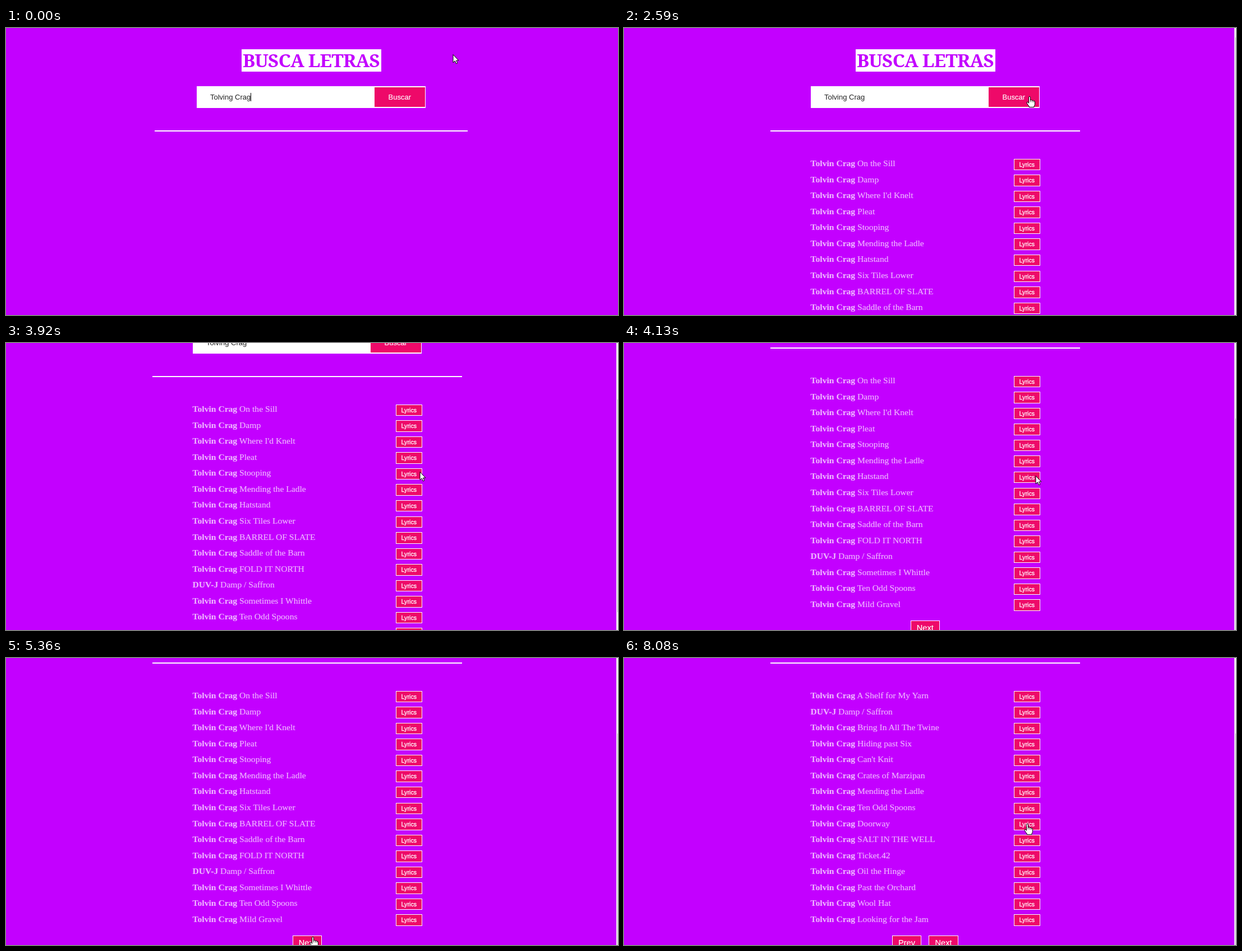
Write an HTML page that moves like this. It is 1091 px wide and 513 px high and loops after 8270 ms.

```html
<!DOCTYPE html>
<html lang="es">
<head>
<meta charset="utf-8">
<title>Busca letras</title>
<style>
  html, body { margin: 0; width: 100%; height: 100%; overflow: hidden; background: #c300ff; }
  #stage { position: absolute; inset: 0; overflow: clip; contain: strict; }
  #page { position: absolute; inset: 0; font-family: "Liberation Sans", Arial, sans-serif; color: #fff; }
  #page *, #bar, #bar i, svg { position: absolute; box-sizing: border-box; white-space: pre; }
  h1 { left: 419.5px; top: 37.5px; width: 249px; height: 40px; margin: 0; background: #fff; color: #c300ff;
       font: bold 33px/40px "Noto Serif", serif; letter-spacing: -.8px; text-align: center; }
  #form { left: 340px; top: 103.5px; width: 408px; height: 39.5px; background: #fff; font-size: 13px; line-height: 39px; }
  #query { left: 24px; color: #222; }
  #caret { left: 96px; top: 12px; width: 1px; height: 15px; background: #000; }
  .btn { background: #ee0969; color: #fff; text-align: center; -webkit-text-stroke: .15px; }
  #search { left: 317px; top: 2px; width: 89.5px; height: 35.5px; line-height: 35px; }
  #rule { left: 265px; top: 183px; width: 558px; height: 2px; background: #fff; }
  .results h1 { left: 412.5px; }
  .results #form { left: 333px; }
  .results #rule { left: 261px; width: 551.5px; }
  .row { left: 332.6px; width: 409px; height: 28.53px; color: #edb3ff; -webkit-text-stroke: .2px;
         font: 15.6px/28.53px "Liberation Serif", "Times New Roman", serif; }
  #page .row b { position: static; }
  .lyrics { right: 0; top: 5.5px; width: 46.5px; height: 20.5px; border: 1px solid #fff; -webkit-text-stroke: .3px;
            font: 10.7px/18.5px "Liberation Sans", Arial, sans-serif; }
  .nav { top: 671px; width: 52.5px; height: 27px; border: 1.5px solid #fff; font-size: 14.6px; line-height: 24px; }
  #bar { left: 1088px; top: 0; width: 3px; height: 100%; background: #f1f1f1; }
  #bar i { left: 2px; width: 1px; height: 380px; background: #c1c1c1; }
  svg { left: 0; top: 0; overflow: visible; fill: #fff; stroke: #000; stroke-linejoin: round; }
</style>
</head>
<body>
<div id="stage">
  <div id="page">
    <h1>BUSCA LETRAS</h1>
    <div id="form"><span id="query">Tolving Crag</span><i id="caret"></i><div id="search" class="btn">Buscar</div></div>
    <div id="rule"></div>
    <div id="first"></div>
    <div id="second"></div>
  </div>
  <div id="bar"><i id="thumb"></i></div>
  <svg id="cursor" width="16" height="21">
    <path id="arrow" d="M0 .5V14.8L3.3 11.8 5.5 16.8 7.8 15.8 5.7 11H9.9Z"/>
    <g id="hand">
      <path d="M-1.4 11V1.8Q-1.4.5 0 .5T1.4 1.8V7Q3.6 5.9 4.4 7.5 6.4 6.6 7.1 8.3 9.4 7.8 9.4 10V14.5Q9.2 16.4 8 17.6V19.5H-.8V18Q-2.8 15.8-4.6 12.6-5.5 10.5-4.2 10.2-2.8 10-1.4 12.4Z"/>
      <path d="M1.4 7V10.4M4.4 7.5V10.6M7.1 8.3V10.9" stroke-width=".8"/>
    </g>
  </svg>
</div>
<script>
const LOOP = 8270, SCROLL = 175;
const $ = id => document.getElementById(id);
const clamp = v => Math.min(1, Math.max(0, v));

const firstSongs = ["On the Sill", "Damp", "Where I'd Knelt", "Pleat", "Stooping", "Mending the Ladle", "Hatstand",
  "Six Tiles Lower", "BARREL OF SLATE", "Saddle of the Barn", "FOLD IT NORTH", "Damp / Saffron",
  "Sometimes I Whittle", "Ten Odd Spoons", "Mild Gravel"];
const secondSongs = ["A Shelf for My Yarn", "Damp / Saffron", "Bring In All The Twine", "Hiding past Six", "Can't Knit",
  "Crates of Marzipan", "Mending the Ladle", "Ten Odd Spoons", "Doorway", "SALT IN THE WELL", "Ticket.42",
  "Oil the Hinge", "Past the Orchard", "Wool Hat", "Looking for the Jam"];

const row = (song, i) => `<div class="row" style="top:${228.3 + i * 28.53}px"><b>${
  song.includes("/") ? "DUV-J" : "Tolvin Crag"}</b> ${song}<span class="btn lyrics">Lyrics</span></div>`;
const nav = (label, x) => `<div class="btn nav" style="left:${x}px">${label}</div>`;
$("first").innerHTML = firstSongs.map(row).join("") + nav("Next", 510.5);
$("second").innerHTML = secondSongs.map(row).join("") + nav("Prev", 477.7) + nav("Next", 543.3);

// Pointer stops: time, x, y, and 1 where it is a hand until the next stop
const stops = [
  [0, 797, 47], [20, 797, 47], [600, 742, 108, 1], [850, 723, 122, 1], [2830, 723, 122, 1],
  [3010, 719, 142], [3370, 692, 228], [3550, 736, 231], [3840, 736, 231], [4130, 734, 237],
  [4660, 626, 353], [5200, 556, 480], [5300, 549, 496, 1], [5490, 546, 497, 1], [5510, 546, 497, 1],
  [5690, 541, 496, 1], [6030, 541, 496], [6710, 547, 415], [7440, 547, 415], [7800, 660, 365],
  [7960, 708, 318, 1], [8080, 719, 296, 1], [LOOP, 719, 296, 1]
];

const same = (a, b) => a[1] === b[1] && a[2] === b[2];
function slope(i, k) {
  const a = stops[i - 1], p = stops[i], b = stops[i + 1];
  return !a || !b || same(a, p) || same(p, b) ? 0 : (b[k] - a[k]) / (b[0] - a[0]);
}
function pointer(t) {
  const i = stops.findIndex((s, n) => n === stops.length - 2 || t < stops[n + 1][0]);
  const a = stops[i], b = stops[i + 1], d = b[0] - a[0], u = (t - a[0]) / d, v = 1 - u;
  const at = k => Math.round(v * v * (1 + 2 * u) * a[k] + u * u * (3 - 2 * u) * b[k]
    + d * u * v * (v * slope(i, k) - u * slope(i + 1, k)));
  return { x: at(1), y: at(2), hand: !!a[3] };
}

const show = (id, on) => $(id).style.display = on ? "" : "none";
function draw(now) {
  const t = now % LOOP, found = t >= 2590, next = t >= 6030;
  const scrolled = 1 - (1 - clamp((t - 3830) / 270)) ** 3;
  const { x, y, hand } = pointer(t);
  $("page").className = found ? "results" : "";
  $("page").style.transform = `translateY(${-SCROLL * scrolled}px)`;
  $("search").style.transform = t >= 1310 && t < 1390 ? "scale(.95)" : "";
  $("thumb").style.top = 17 + 118 * scrolled + "px";
  $("cursor").style.transform = `translate(${x}px,${y}px)`;
  show("caret", t < 180 || t >= 710 && t < 1240);
  show("first", found && !next);
  show("second", next);
  show("bar", found);
  show("hand", hand);
  show("arrow", !hand);
  requestAnimationFrame(draw);
}
requestAnimationFrame(draw);
</script>
</body>
</html>
```
